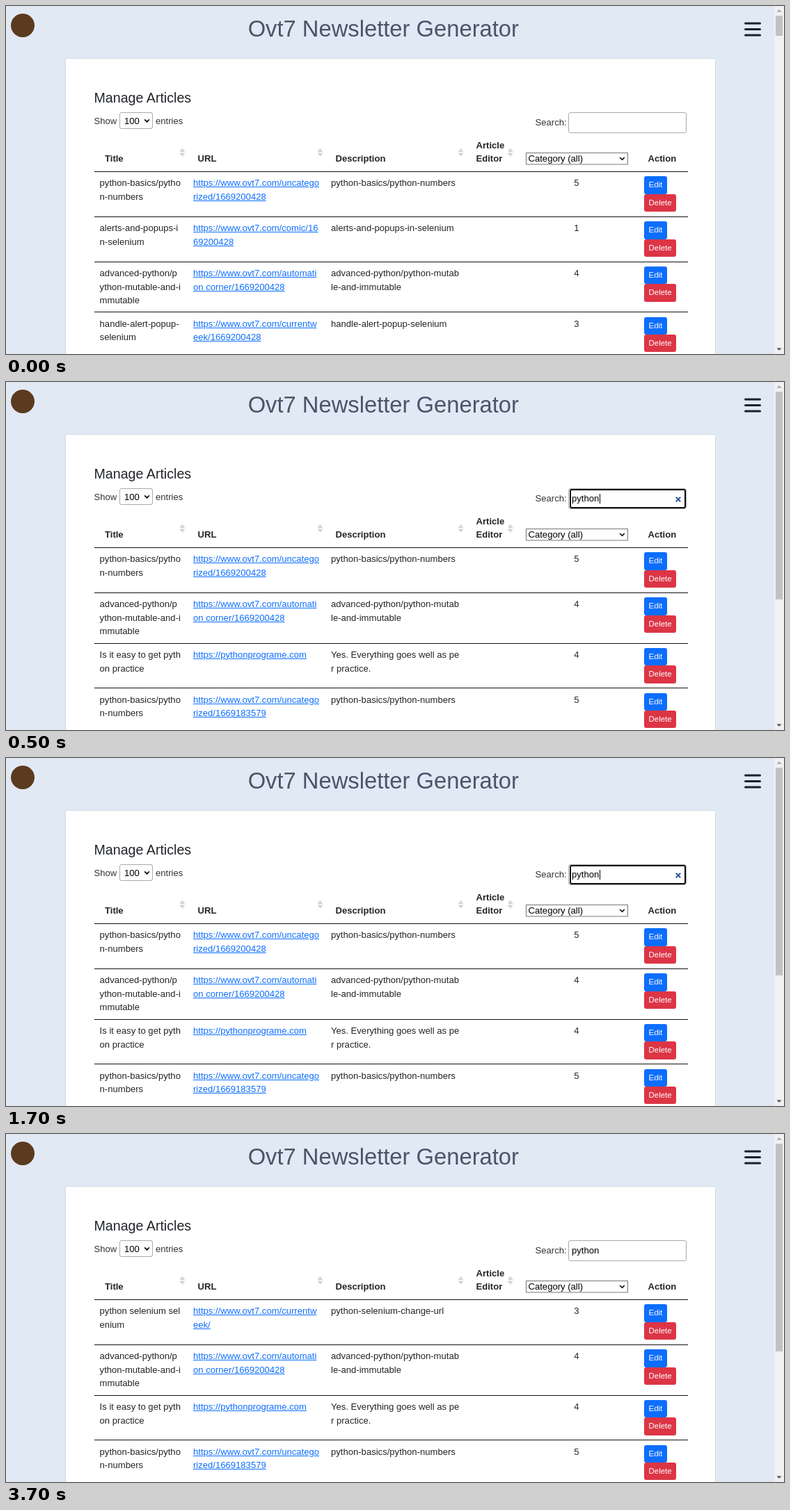
Write an HTML page that moves like this. It is 1118 by 501 pixels and loops after 4500 ms.

```html
<!DOCTYPE html>
<html lang="en">
<head>
<meta charset="utf-8">
<title>Newsletter Generator</title>
<style>
html, body { margin: 0; width: 100%; height: 100%; overflow: hidden; }
body { position: relative; background: #e1e9f5; color: #212529;
  font: 13.095px/19.64px "Liberation Sans", Arial, sans-serif; }
svg { position: absolute; left: 0; top: 0; }
.row { position: absolute; left: 127px; width: 853px; white-space: pre; }
.row > * { position: absolute; top: 0; }
.row hr { top: -7.4px; left: 0; width: 100%; height: 1px; margin: 0; border: 0; background: #111; }
.row a { left: 142px; color: #0d6efd; text-decoration: underline; }
.row b { left: 790px; height: 25.4px; padding: 0 6.5px; border-radius: 3px; color: #fff;
  font: 11.46px/25.4px "Liberation Sans", Arial, sans-serif; }
.edit { background: #0d6efd; }
.row .delete { top: 25.4px; background: #dc3545; }
</style>
</head>
<body>
<svg width="1118" height="501" viewBox="0 0 1118 501" fill="#212529">
  <defs>
    <path id="sort" d="M-4 210L0 204.8L4 210ZM-4 211.6L0 216.8L4 211.6Z" fill="#d3d3d3"/>
    <path id="chevron" d="M-3.3 -1.7L0 1.7L3.3 -1.7" fill="none" stroke="#111" stroke-width="1.7"/>
  </defs>
  <circle cx="24" cy="28" r="17" fill="#5b3a20"/>
  <text x="542.3" y="43.7" font-size="32.74" fill="#4a5568" text-anchor="middle">Ovt7 Newsletter Generator</text>
  <path d="M1062.5 25H1083.5M1062.5 33.5H1083.5M1062.5 42H1083.5" stroke="#1c2024" stroke-width="3" stroke-linecap="round"/>

  <rect x="85.5" y="75.5" width="934" height="440" rx="2" fill="#fff" stroke="#d2d9e4"/>
  <text x="126.5" y="138.5" font-size="19.64">Manage Articles</text>

  <g fill="#333">
    <text x="126.5" y="169.6">Show</text>
    <text x="215" y="169.6">entries</text>
    <text x="760.5" y="172.2">Search:</text>
  </g>
  <rect x="163.5" y="153.5" width="47" height="23" rx="2.5" fill="#fff" stroke="#aaa"/>
  <text x="170" y="169.6" fill="#000">100</text>
  <use href="#chevron" x="202.5" y="165"/>

  <rect x="808.5" y="153.5" width="169" height="29" rx="2.5" fill="#fff" stroke="#aaa"/>
  <g id="focus">
    <rect x="811" y="155" width="165" height="26" rx="2" fill="none" stroke="#101010" stroke-width="2"/>
    <path d="M853.5 161V175" stroke="#000"/>
    <path d="M962.8 165.8L969.2 172.2M969.2 165.8L962.8 172.2" stroke="#2f5597" stroke-width="2"/>
  </g>
  <text id="query" x="813" y="172.2" fill="#000"></text>

  <g font-weight="bold">
    <text x="142" y="224.2">Title</text>
    <text x="275.5" y="224.2">URL</text>
    <text x="473.5" y="224.2">Description</text>
    <text x="675.5" y="204.6">Article</text>
    <text x="675.5" y="224.2">Editor</text>
    <text x="922.5" y="224.2">Action</text>
  </g>
  <use href="#sort" x="253.3"/>
  <use href="#sort" x="451.5"/>
  <use href="#sort" x="653.5"/>
  <use href="#sort" x="724.8"/>
  <rect x="747.5" y="211.5" width="146" height="16.5" fill="#fff" stroke="#767676"/>
  <text x="750.5" y="224.2" fill="#000">Category (all)</text>
  <use href="#chevron" x="885.5" y="219.7"/>

  <rect x="1104" width="14" height="501" fill="#f1f1f1"/>
  <path d="M1107.5 8.5L1111 5L1114.5 8.5Z" fill="#a3a3a3"/>
  <path d="M1107.5 492.5L1111 496L1114.5 492.5Z" fill="#505050"/>
  <rect id="thumb" x="1106" y="14" width="10" fill="#c1c1c1"/>
</svg>
<div id="rows"></div>
<script>
const site = "https://www.ovt7.com/";
const $ = id => document.getElementById(id);

// Each article: title, URL, description, category
const numbers = id => ["python-basics/pytho\nn-numbers", site + "uncatego\nrized/" + id, "python-basics/python-numbers", 5];
const mutable = ["advanced-python/p\nython-mutable-and-i\nmmutable", site + "automati\non corner/1669200428",
  "advanced-python/python-mutab\nle-and-immutable", 4];
const alerts = ["alerts-and-popups-i\nn-selenium", site + "comic/16\n69200428", "alerts-and-popups-in-selenium", 1];
const popup = ["handle-alert-popup-\nselenium", site + "currentw\neek/1669200428", "handle-alert-popup-selenium", 3];
const practice = ["Is it easy to get pyth\non practice", "https://pythonprograme.com", "Yes. Everything goes well as pe\nr practice.", 4];
const changeUrl = ["python selenium sel\nenium", site + "currentw\neek/", "python-selenium-change-url", 3];

const states = [
  { until: 500, query: "", thumb: 29, rows: [numbers(1669200428), alerts, mutable, popup] },
  { until: 2500, query: "python", focus: true, thumb: 299, rows: [numbers(1669200428), mutable, practice, numbers(1669183579)] },
  { until: 4500, query: "python", thumb: 299, rows: [changeUrl, mutable, practice, numbers(1669183579)] }
];

function show(state) {
  let y = 245.4;
  $("rows").innerHTML = state.rows.map(([title, url, text, category]) => {
    const html = `<div class="row" style="top:${y}px"><hr><span style="left:7.6px">${title}</span><a>${url}</a>` +
      `<span style="left:340px">${text}</span><span style="left:689.3px">${category}</span>` +
      `<b class="edit">Edit</b><b class="delete">Delete</b></div>`;
    y += title.split("\n").length > 2 ? 72.8 : 64.75;
    return html;
  }).join("");
  $("query").textContent = state.query;
  $("focus").style.display = state.focus ? "" : "none";
  $("thumb").setAttribute("height", state.thumb);
}

let current;
function tick() {
  const time = performance.now() % 4500;
  const state = states.find(s => time < s.until);
  if (state !== current) show(current = state);
  requestAnimationFrame(tick);
}
tick();
</script>
</body>
</html>
```
